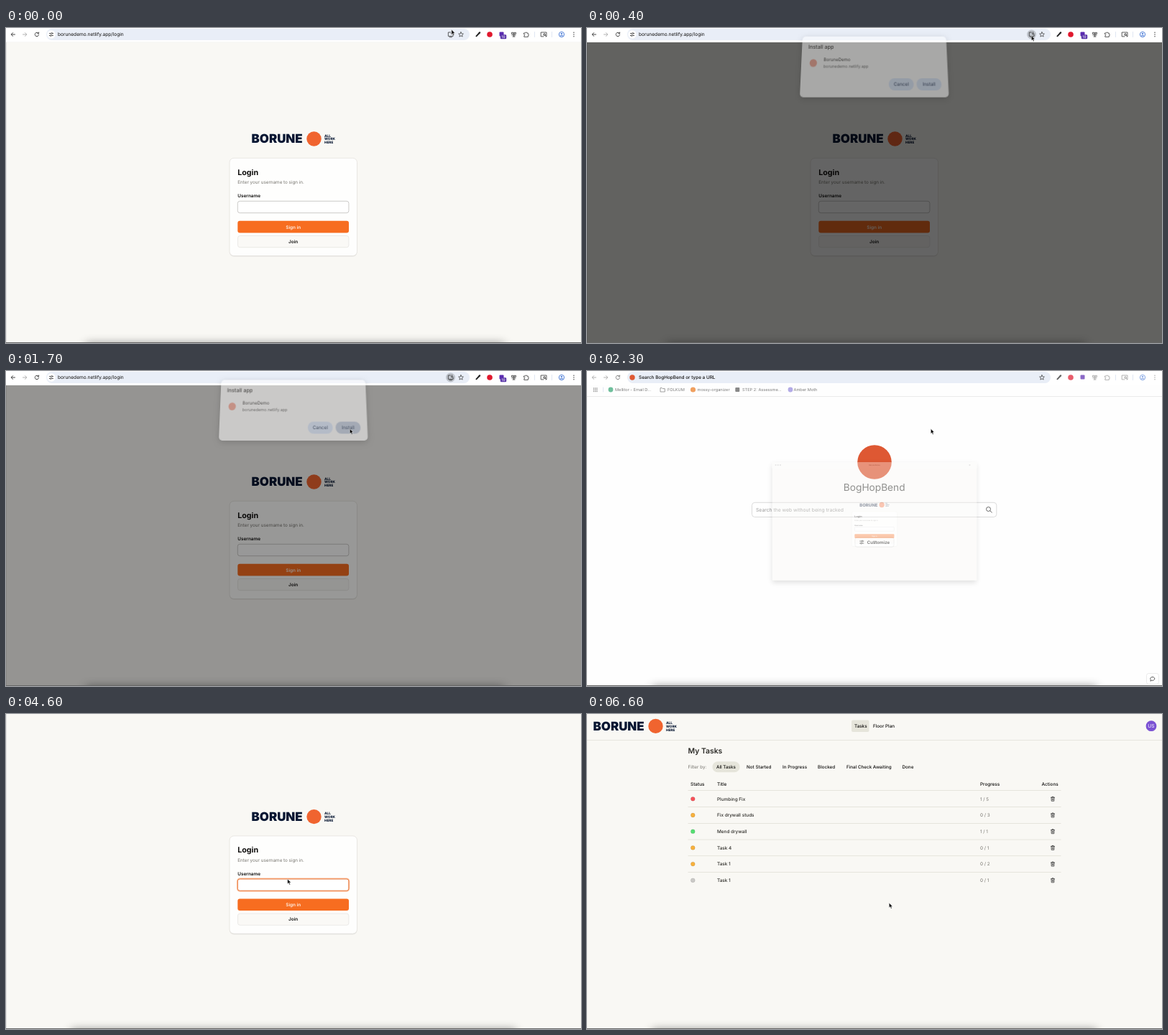
These frames come from a looping animation (800 by 439 pixels, 6.7 s). An HTML page:

```html
<!DOCTYPE html>
<html lang="en">
<head>
<meta charset="utf-8">
<title>Install and sign in</title>
<style>
  html, body { margin: 0; width: 100%; height: 100%; overflow: hidden; background: #fff; }
  #stage { position: relative; width: 800px; height: 439px; overflow: hidden; background: #f9f8f4; }
  #stage > * { position: absolute; left: 0; top: 0; }
  svg { display: block; overflow: visible; font-family: Inter, Roboto, sans-serif; text-rendering: geometricPrecision; }
  #dim { top: 20px; width: 800px; height: 419px; background: #000; }
  #stage > #dialog { left: 296px; top: 19px; transform-origin: 50% 100%; filter: drop-shadow(0 2px 4px #0005); }
  #stage > #app { top: -24px; background: #f9f8f4; transform-origin: 400px 234.5px; box-shadow: 0 8px 20px #0005; }
  #stage > #dock { top: 441px; height: 20px; box-shadow: 0 0 13px 1px #0007; }
  #stage > #edge { top: 438px; width: 800px; height: 1px; background: #666; }
</style>
</head>
<body>
<div id="stage">
  <svg id="browser" width="800" height="439"></svg>
  <div id="dim"></div>
  <svg id="dialog" width="207.5" height="82" viewBox="296 19 207.5 82"></svg>
  <svg id="app" width="800" height="463" viewBox="0 -24 800 463"></svg>
  <div id="dock"></div>
  <div id="edge"></div>
  <svg id="cursor" width="6" height="9"><path d="M.3.3V7L1.9 5.6 3 8.2 4.2 7.7 3.1 5.2H5.2Z" fill="#000" stroke="#fff" stroke-width=".5"/></svg>
</div>
<script>
const LOOP = 6700, INK = '#0e0d0c', NAVY = '#071632', ORANGE = '#f76d20', GREY = '#77756f', PILL = '#e6e5db';
const $ = id => document.getElementById(id);

// SVG helpers
const rect = (x, y, w, h, fill, r = 0, more = '') =>
  `<rect x="${x}" y="${y}" width="${w}" height="${h}" rx="${r}" fill="${fill}" ${more}/>`;
const circle = (x, y, r, fill, more = '') => `<circle cx="${x}" cy="${y}" r="${r}" fill="${fill}" ${more}/>`;
const path = (d, color = '#333', w = .9) =>
  `<path d="${d}" fill="none" stroke="${color}" stroke-width="${w}" stroke-linecap="round" stroke-linejoin="round"/>`;
const text = (s, x, y, size, fill = INK, weight = 400, anchor = 'start') =>
  `<text x="${x}" y="${y}" font-size="${size}" fill="${fill}" font-weight="${weight}" text-anchor="${anchor}">${s}</text>`;
const group = (body, more = '') => `<g ${more}>${body}</g>`;
const shift = (x, y, body) => group(body, `transform="translate(${x} ${y})"`);
const line = (color, w = .6) => `stroke="${color}" stroke-width="${w}"`;
const tune = (x, y, c) => shift(x, y,
  path('M-2.6-1.5H-.4M1.8-1.5H2.6M-2.6 1.5H-1.8M.4 1.5H2.6', c, .8) +
  circle(.7, -1.5, 1, 'none', line(c, .7)) + circle(-.7, 1.5, 1, 'none', line(c, .7)));
const lens = (x, y, r, c) => shift(x, y, circle(-.5, -.5, r, 'none', line(c, .9)) + path(`M${r * .6} ${r * .6}L${r * 1.4} ${r * 1.4}`, c));

const logo = () =>
  text('BORUNE', 341.5, 160.2, 16.9, NAVY, 900) + circle(428.5, 154.5, 10.2, '#f0642f') +
  ['ALL', 'WORK', 'HERE'].map((s, i) => text(s, 443, 151.6 + i * 4.8, 4.7, NAVY, 800)).join('');

const login = (field = '') => logo() +
  rect(311, 182.3, 177.5, 136.5, '#0001', 6) +
  rect(311, 181.3, 177.5, 136.2, '#fefefd', 6, line('#dddbd5')) +
  text('Login', 322.2, 204.5, 10.7, INK, 700) +
  text('Enter your username to sign in.', 322.3, 217.4, 6.3, GREY) +
  text('Username', 322.3, 236.4, 6.4, INK, 600) +
  rect(322.3, 241.3, 154.6, 16.4, '#fff', 3, line('#a9a8a5')) + field +
  rect(322.3, 268.8, 154.7, 16.6, ORANGE, 3) + text('Sign in', 399.7, 279.5, 6.4, '#fff3ea', 600, 'middle') +
  rect(322.5, 289.5, 154.4, 16.2, '#faf9f6', 3, line('#e0deda')) + text('Join', 399.7, 299.9, 6.4, INK, 600, 'middle');

// Browser toolbar, either on the login page or on a new tab
function toolbar(address, newTab) {
  const c = newTab ? '#777' : '#333';
  const tools =
    path('M654.4 11.3l3.6-3.8', '#222', 1.9) + path('M658.4 7.1l.7-.7', '#222', 2.2) +
    circle(673, 9, 3.8, '#e0182d') +
    rect(686.5, 5.5, 6, 6, '#5b2bb0', 1) +
    (newTab ? '' : rect(687.8, 9.2, 8.4, 6, '#5a35a8', 1.3) + text('10', 692, 14, 4.8, '#fff', 500, 'middle')) +
    path('M703.8 6.3h2.4v2h-2.4zM707.4 6.3h2v2h-2zM704 10h5M705 12h3M706.6 8.5v3.3', c, .8) +
    path('M720.8 7h1.8a1 1 0 0 1 2 0h1.7v1.8a1 1 0 0 1 0 2v1.6h-5.5v-1.7a1 1 0 0 0 0-2Z', c, .8) +
    path('M748 11.9h-3.8V6h7.8v5.9h-1', c, .8) + lens(749.6, 9.6, 1.3, c) +
    circle(773, 9, 3.7, '#eef3fe', line('#3a6fd0', .8)) + circle(773, 8, 1.1, '#3a6fd0') + path('M771 11q2-1.6 4 0', '#3a6fd0') +
    [6.3, 9, 11.7].map(y => circle(790, y, .7, c)).join('');
  return rect(0, 0, 800, 19.5, '#fff') + rect(56, 1, 589, 16, '#e9eef7', 8) +
    path('M12.5 9H7.3M9.6 6.6 7.2 9l2.4 2.4', newTab ? '#aaa' : c) +
    path('M23.5 9h5.2M26.4 6.6 28.8 9l-2.4 2.4', '#aaa') +
    path('M45 7.2A2.7 2.7 0 1 0 45.6 9.6M45.6 6v1.8H43.8', c) +
    (newTab ? circle(63, 9, 3.7, '#de5833') : circle(63, 9, 5.8, '#fff') + tune(63, 9, '#333')) +
    text(address, 72, 11.2, newTab ? 6.4 : 6.6, INK, newTab ? 500 : 400) +
    (newTab ? '' : circle(618.5, 9, 6.5, '#bfc4cc', 'id="press"') +
      path('M618.5 6h-3.2v5.4h6.8V9M617 12.8h3.4M620.5 5.6v3.2M619.2 7.7l1.3 1.3 1.3-1.3', '#333', .8)) +
    path('M633 5.7l1 2.2 2.4.2-1.8 1.6.5 2.4-2.1-1.3-2.1 1.3.5-2.4-1.8-1.6 2.4-.2Z', '#333', .7) +
    path('M735.5 5.5v7M759.5 5.5v7', '#d3dcec', .7) + group(tools, `opacity="${newTab ? .7 : 1}"`);
}

function newTab() {
  const grey = '#7d7d7d';
  const marks = [['Mellitor - Email D...', 39], ['FOLKUM', 112], ['mossy-organizer', 153.5], ['STEP 2: Assessme...', 216], ['Amber Moth', 287.5]];
  let grid = '';
  for (let i = 0; i < 9; i++) grid += rect(8.8 + i % 3 * 2.2, 23.4 + (i / 3 | 0) * 2.2, 1.3, 1.3, '#888');
  return rect(0, 0, 800, 439, '#fefefe') + toolbar('Search BogHopBend or type a URL', true) +
    rect(0, 35.2, 800, .7, '#e4e4e4') + grid + path('M22.5 23v6', '#d3dcec', .7) +
    circle(33, 26, 3.4, '#6fbf9c') + path('M102 28.6V23.6h2.3l.8 1h3.2v4Z', '#888', .8) +
    circle(147.5, 26, 3.6, '#f0a060') + rect(206.3, 23, 6, 6, '#888', 1) + circle(283, 26, 3.4, '#b3abe6') +
    marks.map(([s, x]) => text(s, x, 28, 5.65, grey)).join('') +
    group(circle(400, 127, 23.8, '#de5833') +
      text('BogHopBend', 399.7, 167.2, 13.7, '#555', 400, 'middle') +
      rect(229.5, 183.3, 340.3, 20.2, '#fff', 4, line('#d2d2d2', .8)) +
      text('Search the web without being tracked', 235, 195.7, 6.8, '#999') + lens(559, 193, 3, '#555') +
      rect(373, 231.7, 54, 13.8, '#fff', 3, line('#e3e3e3')) + tune(382.3, 238.6, '#333') +
      text('Customize', 389.7, 240.8, 6.1, '#333', 600) +
      rect(778.5, 421.5, 17, 15, '#fff', 3, line('#ddd')) +
      path('M784 431.8l.4-1.4a3 2.5 0 1 1 1.6.9Z', '#333', .8), 'id="tabBody"');
}

function tasks() {
  const filters = [['All Tasks', 180], ['Not Started', 222], ['In Progress', 272], ['Blocked', 321], ['Final Check Awaiting', 361], ['Done', 438.5]];
  const rows = [['Plumbing Fix', '1 / 5', '#f7525a'], ['Fix drywall studs', '0 / 3', '#f8b13c'], ['Mend drywall', '1 / 1', '#55df72'],
    ['Task 4', '0 / 1', '#f8b13c'], ['Task 1', '0 / 2', '#f8b13c'], ['Task 1', '0 / 1', '#cbcac7']];
  const bin = path('M-2.5-2h5M-1-2v-1h2v1M-2-2l.2 5h3.6L2-2M-.7-.4v2M.7-.4v2', '#333', .75);
  const body = rows.map(([title, done, color], i) => shift(0, 118.3 + i * 22.7,
    circle(147.3, 0, 2.9, color, 'stroke="#0003" stroke-width=".5"') + text(title, 181, 2.2, 6.4, '#2b2a26', 500) +
    text(done, 547, 2.2, 6.3, GREY) + shift(648, 0, bin) + (i < 5 ? rect(140.5, 11, 519, .7, '#dedcd3') : ''))).join('');
  return rect(0, 0, 800, 439, '#f9f8f4') + rect(0, 36, 800, .7, '#e0ded7') + shift(-333, -137.6, logo()) +
    rect(368, 8.5, 24.5, 16.5, PILL, 2) + text('Tasks', 372, 19, 6.3, INK, 500) + text('Floor Plan', 398, 19, 6.3, INK, 500) +
    circle(785, 16.7, 7.4, '#7b52d3') + text('US', 785, 19.2, 6.8, '#fff', 400, 'middle') +
    text('My Tasks', 140.5, 55.4, 10.4, '#2b2a26', 600) + text('Filter by:', 140.5, 76, 6.3, GREY) +
    rect(174.4, 66.2, 38.2, 15, PILL, 7.5) + filters.map(([s, x]) => text(s, x, 76, 6.3, INK, 500)).join('') +
    [['Status', 144], ['Title', 181], ['Progress', 547]].map(([s, x]) => text(s, x, 100.2, 6.4, INK, 500)).join('') +
    text('Actions', 655.7, 100.2, 6.4, INK, 500, 'end') + rect(140.5, 106.3, 519, .7, '#dedcd3') + group(body, 'id="rows"');
}

const field = group(rect(321.8, 240.8, 155.6, 17.4, 'none', 3.6, line('#fbc6a6', 1.8)) +
    rect(322.3, 241.3, 154.6, 16.4, 'none', 3, line('#ee7436', .9)), 'id="ring"') +
  `<text id="typed" x="328.2" y="251.8" font-size="6.5" fill="${INK}"></text>` + rect(328.5, 245.8, .6, 7.6, INK, 0, 'id="caret"');

$('browser').innerHTML = group(rect(0, 19.3, 800, .5, '#e4e4e4') + rect(0, 20, .5, 419, '#ccc') +
  toolbar('borunedemo.netlify.app/login') + login(), 'id="page"') + group(newTab(), 'id="tab"');

$('dialog').innerHTML = rect(296, 19, 207.5, 82, '#fff', 5) + text('Install app', 305, 35.7, 7.5, INK, 500) +
  circle(313, 55.5, 5.2, '#f28e78') + text('BoruneDemo', 327.5, 53, 6.2) +
  text('borunedemo.netlify.app', 327.5, 61.8, 5.7, '#474747') +
  rect(420, 76, 35, 16, '#d3e3fd', 8) + text('Cancel', 437.5, 86.2, 6.4, '#14294d', 500, 'middle') +
  rect(459, 76, 35, 16, '#d3e3fd', 8, 'id="install"') + text('Install', 476.5, 86.2, 6.4, '#14294d', 500, 'middle');

$('app').innerHTML = rect(0, -24, 800, 24, '#fbfaf8') + [14, 23, 32].map(x => circle(x, -12.5, 3, '#bbb')).join('') +
  text('BoruneDemo', 400, -10, 7, '#777', 500, 'middle') + circle(772, -12.5, 3, '#bbb') + rect(0, 0, .5, 439, '#ccc') +
  shift(0, -11.4, login(field)) + group(tasks(), 'id="tasks"');

// Linear track through [time, value, ...] stops
function track(t, stops) {
  const i = stops.findIndex(s => s[0] > t);
  if (i === 0) return stops[0].slice(1);
  if (i < 0) return stops.at(-1).slice(1);
  const a = stops[i - 1], b = stops[i], k = (t - a[0]) / (b[0] - a[0]);
  return a.slice(1).map((v, j) => v + (b[j + 1] - v) * k);
}
const show = (id, on) => $(id).style.display = on ? '' : 'none';
const fade = (id, v) => { $(id).style.opacity = v; show(id, v > 0); };

function draw(now) {
  const t = Math.floor(now % LOOP / 100) * 100;

  show('page', t < 2000);
  show('press', t >= 200 && t < 1800);
  fade('dim', .605 * track(t, [[200, 0], [400, 1], [1600, 1], [1900, 0]])[0]);
  const [open] = track(t, [[300, 0], [400, .45], [500, .82], [600, 1], [1600, 1], [1800, 0]]);
  const away = 1 - open;
  fade('dialog', open);
  // The sheet swings in from the top; the stretch offsets the foreshortening
  $('dialog').style.transform = away
    ? `perspective(250px) translateY(${-8 * away}px) rotateX(${11.5 * away}deg) scaleY(${1 + .15 * away})` : 'none';
  $('install').setAttribute('fill', t >= 1400 ? '#b3c1d9' : '#d3e3fd');

  show('tab', t >= 2000 && t < 2500);
  fade('tabBody', track(t, [[1900, 0], [2200, 1]])[0]);

  const [scale, alpha] = track(t, [[2200, .1, 0], [2300, .356, .36], [2400, .87, .9], [2500, 1, 1]]);
  fade('app', alpha);
  $('app').style.transform = `scale(${scale})`;

  $('typed').textContent = t < 4900 ? '' : 'user'.slice(0, t < 5000 ? 2 : t < 5300 ? 3 : 4);
  show('ring', t >= 4100);
  show('caret', t >= 4100 && (t < 4600 || t >= 4900));
  show('tasks', t >= 5600);
  if (t >= 2500) $('caret').setAttribute('x', 328.5 + $('typed').getComputedTextLength());
  fade('rows', track(t, [[5600, 0], [5900, 1]])[0]);

  const wide = t >= 2000;
  $('dock').style.left = (wide ? 92 : 112) + 'px';
  $('dock').style.width = (wide ? 616 : 580) + 'px';

  const [x, y] = track(t, [[0, 619.5, 2], [200, 618, 10.5], [800, 618, 10.5], [1500, 478, 80.3],
    [3500, 478, 80.3], [4200, 391.8, 230], [4300, 391.3, 229.7], [6100, 391.3, 229.7], [6600, 420, 263]]);
  show('cursor', t < 4900 || t >= 6200);
  $('cursor').style.transform = `translate(${x}px, ${y}px)`;
}

function tick() {
  draw(performance.now());
  requestAnimationFrame(tick);
}
tick();
</script>
</body>
</html>
```
